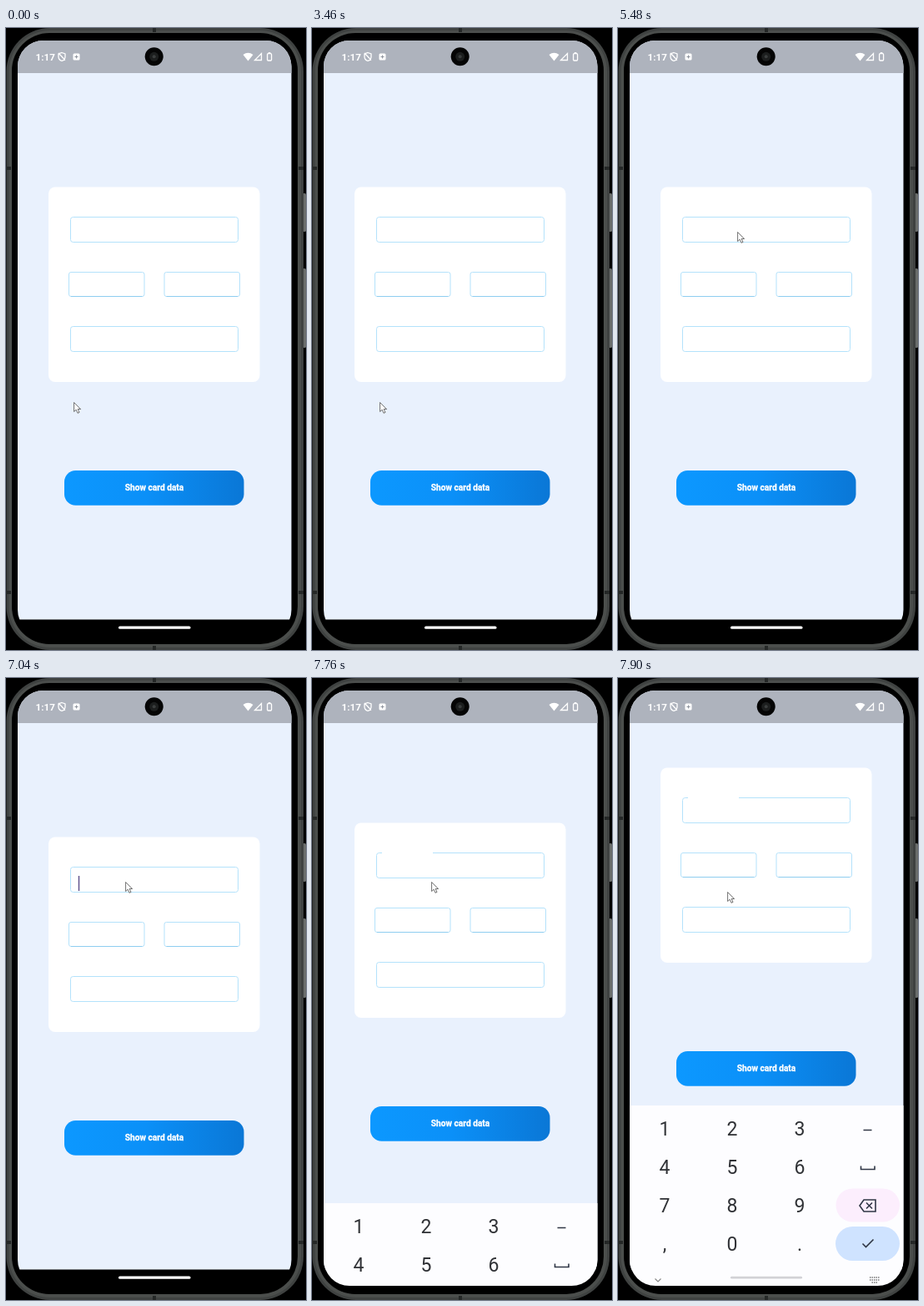
An HTML page that plays this animation: 360x745 px, repeating every 8000 ms.

```html
<!DOCTYPE html>
<html lang="en">
<head>
<meta charset="utf-8">
<title>Card form</title>
<style>
  html, body { margin: 0; width: 100%; height: 100%; overflow: hidden; background: #000; }
  svg { display: block; width: 360px; height: 745px; }
  text { font-family: Roboto, sans-serif; text-anchor: middle; }
  .field { fill: none; stroke: #b4e2fb; stroke-width: 1; }
  .digit { font-size: 23px; fill: #303236; }
  .line { fill: none; stroke: #303746; stroke-width: 1.6; }
</style>
</head>
<body>
<svg viewBox="0 0 360 745">
  <defs>
    <linearGradient id="blue">
      <stop offset="0" stop-color="#0c98ff"/>
      <stop offset=".45" stop-color="#0b90f8"/>
      <stop offset="1" stop-color="#0a77d6"/>
    </linearGradient>
    <clipPath id="screen"><rect x="14" y="15" width="328.5" height="713" rx="31"/></clipPath>
  </defs>

  <!-- phone body -->
  <g fill="#6a6d6b">
    <rect x="356" y="198" width="4" height="46" rx="1.5"/>
    <rect x="356" y="288" width="4" height="95" rx="1.5"/>
  </g>
  <rect x=".5" y="0" width="356.5" height="745" rx="52" fill="#3f4241"/>
  <rect x="3.5" y="3" width="350.5" height="739" rx="49" fill="#4b4e4c"/>
  <rect x="7" y="6" width="343" height="732" rx="45" fill="#000"/>
  <path d="M0 168h6M351 168h6M0 676h6M351 676h6M178 0v5M178 740v5" stroke="#252827" stroke-width="4"/>

  <g clip-path="url(#screen)">
    <path d="M14 15h329v693.5h-329z" fill="#e9f1fd"/>
    <rect x="135" y="716.5" width="86.5" height="3.3" rx="1.6" fill="#fff"/>

    <g id="form">
      <rect x="51" y="190.5" width="253.5" height="233.5" rx="8" fill="#fff"/>
      <rect class="field" x="77.5" y="226.5" width="201" height="30" rx="3"/>
      <rect class="field" x="75.5" y="292.5" width="90.5" height="29" rx="2.5"/>
      <rect class="field" x="190" y="292.5" width="90.5" height="29" rx="2.5"/>
      <rect class="field" x="77.5" y="357.5" width="201" height="30" rx="3"/>
      <path d="M78 321.500h85.500M192.500 321.500h85.500" stroke="#8fcdf0"/>
      <path id="notch" d="M84 225h61v3h-61z" fill="#fff"/>
      <path id="caret" d="M87.5 237v18" stroke="#62558f" stroke-width="1.5"/>
      <rect x="70" y="530" width="215.5" height="41.7" rx="13.5" fill="url(#blue)"/>
      <text x="178" y="554.2" font-size="10.2" font-weight="700" fill="#fff" stroke="#fff" stroke-width=".3">Show card data</text>
    </g>

    <path d="M14 15h329v39h-329z" fill="#aeb3bd"/>
    <g id="keyboard">
      <path d="M14 0h329v217h-329z" fill="#fdfdff"/>
      <rect x="261.5" y="99.5" width="76.5" height="40" rx="20" fill="#fceefd"/>
      <rect x="261" y="145" width="77" height="41" rx="20.5" fill="#cfe3ff"/>
      <g class="line">
        <path d="M294.5 29.5h10"/>
        <path d="M291.5 72.5v4h16.5v-4"/>
        <path d="M290 120l5-7h14v14h-14zM298 116.5l7 7M305 116.5l-7 7"/>
        <path d="M293.5 165.5l4 4 9-9"/>
        <path d="M44.5 207.5l3.5 3.5 3.5-3.5" stroke="#888" stroke-width="1.2"/>
        <path d="M302 206h12M302 209h12M304.5 212h7" stroke="#777" stroke-dasharray="1.5 1"/>
      </g>
      <rect x="135" y="204.8" width="86" height="2.8" rx="1.4" fill="#d2d2d6"/>
    </g>
  </g>

  <!-- status bar -->
  <text x="47.2" y="38.5" font-size="11.6" font-weight="600" fill="#fff">1:17</text>
  <g fill="none" stroke="#fff" stroke-width="1.3">
    <path d="M67 29.5l4 1.5v3.5q0 3.5-4 5-4-1.5-4-5v-3.5zM63 30l8 8.5"/>
    <path d="M298.5 38.5h8v-8z"/>
    <rect x="313.6" y="30.7" width="5" height="8.3" rx="1"/>
  </g>
  <g fill="#fff">
    <rect x="80.5" y="30.5" width="8" height="8" rx="1.5"/>
    <path d="M284.5 32q6-4.5 12 0l-6 7.5z"/>
    <path d="M314.8 29h2.6v1.5h-2.6z"/>
  </g>
  <path d="M84.5 32.5v4M82.5 34.5h4" stroke="#8e949e"/>
  <circle cx="177.7" cy="34.3" r="11" fill="#050505"/>
  <circle cx="177.7" cy="34.3" r="5.5" fill="#1c1e1e"/>
  <circle cx="177.7" cy="34.3" r="2" fill="#3a3d3d"/>

  <path id="pointer" d="M0 0v11l2.6-2.3 1.8 4.1 2-.9-1.8-3.9h3.4z" fill="#fff" stroke="#4c4c4c" stroke-width=".8"/>
</svg>

<script>
const LOOP = 8000;
const el = id => document.getElementById(id);
const form = el("form"), keyboard = el("keyboard"), pointer = el("pointer");

// time, x, y
const route = [
  [4600, 81.6, 448.5], [4800, 100, 409], [5000, 133, 343],
  [5200, 153, 286], [5380, 141.6, 257], [5480, 143.6, 244.5]
];
// time, form offset, keyboard top
const slide = [
  [0, 0, 745], [7660, 0, 709], [7720, -4, 670],
  [7760, -17, 629], [7780, -42, 578], [7900, -83, 512]
];

["123", "456", "789", ",0."].forEach((row, r) => {
  [...row].forEach((char, c) => {
    const key = document.createElementNS("http://www.w3.org/2000/svg", "text");
    key.setAttribute("class", "digit");
    key.setAttribute("x", 56 + 81 * c);
    key.setAttribute("y", 35.5 + 46 * r);
    key.textContent = char;
    keyboard.append(key);
  });
});

const place = (node, x, y) => node.setAttribute("transform", `translate(${x} ${y})`);
const show = (node, on) => node.setAttribute("visibility", on ? "visible" : "hidden");

function pointerAt(t) {
  if (t >= 7900) return [131.6, 256.5];
  if (t < 4640) return route[0].slice(1);
  // the pointer is refreshed 14 times on its way
  const tick = (5380 - 4640) / 13;
  const time = t < 5380 ? 4640 + Math.floor((t - 4640) / tick) * tick : t < 5480 ? 5380 : 5480;
  const i = Math.max(1, route.findIndex(p => p[0] >= time));
  const [a, b] = [route[i - 1], route[i]];
  const k = (time - a[0]) / (b[0] - a[0]);
  return [a[1] + (b[1] - a[1]) * k, a[2] + (b[2] - a[2]) * k];
}

function draw() {
  const t = performance.now() % LOOP;
  const [, offset, top] = slide.filter(s => s[0] <= t).pop();
  place(form, 0, offset);
  place(keyboard, 0, top);
  place(pointer, ...pointerAt(t));
  show(el("caret"), t >= 7040 && t < 7420);
  show(el("notch"), t >= 7420);
  requestAnimationFrame(draw);
}
draw();
</script>
</body>
</html>
```
